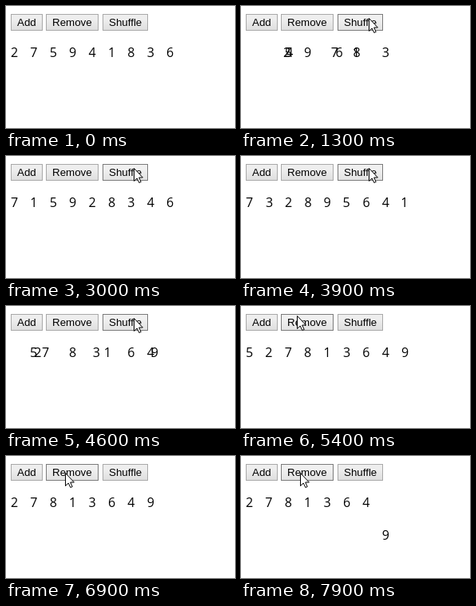
An HTML page for the animation above (8000 ms loop, 287 by 153 pixels).

```html
<!DOCTYPE html>
<html lang="en">
<head>
<meta charset="utf-8">
<title>List shuffle and remove</title>
<style>
  html, body { margin: 0; width: 100%; height: 100%; overflow: hidden; background: #fff; }
  svg { display: block; width: 287px; height: 153px; }
  .label { font: 13.333px "Liberation Sans", Arial, sans-serif; }
  .digit { font: 16px "Open Sans", "Noto Sans", sans-serif; text-anchor: middle; }
  .button rect { fill: url(#normal); stroke: #a9a9a9; }
  .button.hover rect { fill: url(#hover); stroke: #7b7b7b; }
  .button.down rect { fill: url(#down); stroke: #7b7b7b; }
</style>
</head>
<body>
<svg id="stage" viewBox="0 0 287 153">
  <defs>
    <linearGradient id="normal" x2="0" y2="1">
      <stop offset=".3" stop-color="#eee"/><stop offset="1" stop-color="#dedede"/>
    </linearGradient>
    <linearGradient id="hover" x2="0" y2="1">
      <stop offset=".3" stop-color="#f0f0f0"/><stop offset="1" stop-color="#e2e2e2"/>
    </linearGradient>
    <linearGradient id="down" x2="0" y2="1">
      <stop offset=".3" stop-color="#e5e5e5"/><stop offset="1" stop-color="#d5d5d5"/>
    </linearGradient>
  </defs>
  <g id="buttons"></g>
  <g id="digits"></g>
  <path id="cursor" d="M.5 .5V16.5L4.2 13L6.8 18.5L9.2 17.5L6.7 12H11.4Z" fill="#fff" stroke="#000"/>
</svg>
<script>
const LOOP = 8000, TICK = 100, MOVE = 1000;
const FIRST_X = 10.5, PITCH = 24.4, BASE_Y = 64, DROP = 50;

// Each order is reached by a move that starts at the given time.
const orders = [
  { start: -MOVE, list: "275941836" },
  { start: 1015, list: "465928137" },
  { start: 1905, list: "715928346" },
  { start: 3000, list: "732895641" },
  { start: 4100, list: "527813649" }
];
const removals = [{ digit: "5", start: 5890 }, { digit: "9", start: 7390 }];

const buttonSpecs = [
  { text: "Add", x: 6, width: 40, presses: [] },
  { text: "Remove", x: 50, width: 66, presses: [[5800, 6000], [7300, 7500]] },
  { text: "Shuffle", x: 121, width: 57, presses: [[900, 1100], [1800, 1900], [2900, 3000], [4000, 4200]] }
];

// time, x, y of the pointer tip
const pointer = [
  [100, 211, 8], [200, 188, 8], [300, 181, 9], [400, 165, 13], [500, 160, 15],
  [5100, 160, 15], [5200, 140, 12], [5300, 100, 10], [5400, 70, 12],
  [5500, 73, 18], [5600, 74, 21]
];

function make(tag, attrs, parent, text = "") {
  const node = document.createElementNS("http://www.w3.org/2000/svg", tag);
  for (const key in attrs) node.setAttribute(key, attrs[key]);
  node.textContent = text;
  return parent.appendChild(node);
}

// CSS "ease": cubic-bezier(.25, .1, .25, 1)
function ease(x) {
  if (x <= 0) return 0;
  if (x >= 1) return 1;
  const curve = (s, a, b) => 3 * a * s * (1 - s) ** 2 + 3 * b * s * s * (1 - s) + s ** 3;
  let low = 0, high = 1;
  for (let i = 0; i < 24; i++) {
    const mid = (low + high) / 2;
    if (curve(mid, .25, .25) < x) low = mid; else high = mid;
  }
  return curve(low, .1, 1);
}

const buttonLayer = document.getElementById("buttons");
const digitLayer = document.getElementById("digits");
const cursor = document.getElementById("cursor");

const buttons = buttonSpecs.map(spec => {
  const node = make("g", { class: "button" }, buttonLayer);
  make("rect", { x: spec.x + .5, y: 10.5, width: spec.width - 1, height: 20 }, node);
  make("text", { class: "label", x: spec.x + 8, y: 25 }, node, spec.text);
  return { ...spec, node };
});

const digits = [...orders[0].list].map(digit => ({
  digit, node: make("text", { class: "digit" }, digitLayer, digit)
}));

function slotOf(digit, t) {
  let slot = orders[0].list.indexOf(digit);
  for (const { start, list } of orders.slice(1)) {
    slot += (list.indexOf(digit) - slot) * ease((t - start) / MOVE);
  }
  const last = orders[orders.length - 1].list;
  for (const gone of removals) {
    if (t >= gone.start + MOVE && last.indexOf(gone.digit) < last.indexOf(digit)) slot--;
  }
  return slot;
}

function drawDigits(t) {
  for (const { digit, node } of digits) {
    const removal = removals.find(r => r.digit === digit);
    const leaving = removal ? (t - removal.start) / MOVE : 0;
    node.setAttribute("x", FIRST_X + PITCH * slotOf(digit, t));
    node.setAttribute("y", BASE_Y + DROP * ease(leaving));
    node.setAttribute("visibility", leaving >= 1 ? "hidden" : "visible");
  }
}

function pointerAt(t) {
  if (t < pointer[0][0]) return null;
  const next = pointer.findIndex(p => p[0] > t);
  if (next < 0) return pointer[pointer.length - 1].slice(1);
  const [t0, x0, y0] = pointer[next - 1], [t1, x1, y1] = pointer[next];
  const k = (t - t0) / (t1 - t0);
  return [x0 + (x1 - x0) * k, y0 + (y1 - y0) * k];
}

function drawPointer(t) {
  const tip = pointerAt(t);
  cursor.setAttribute("visibility", tip ? "visible" : "hidden");
  if (tip) cursor.setAttribute("transform", `translate(${tip})`);
  for (const { x, width, presses, node } of buttons) {
    const over = tip && tip[0] >= x && tip[0] < x + width && tip[1] >= 10 && tip[1] < 31;
    const down = presses.some(([from, to]) => t >= from && t < to);
    node.setAttribute("class", "button" + (down ? " down" : over ? " hover" : ""));
  }
}

function render(time) {
  const t = Math.floor((time % LOOP) / TICK) * TICK;
  drawDigits(t);
  drawPointer(t);
}

const begin = performance.now();
function frame() {
  render(performance.now() - begin);
  requestAnimationFrame(frame);
}
frame();
</script>
</body>
</html>
```
